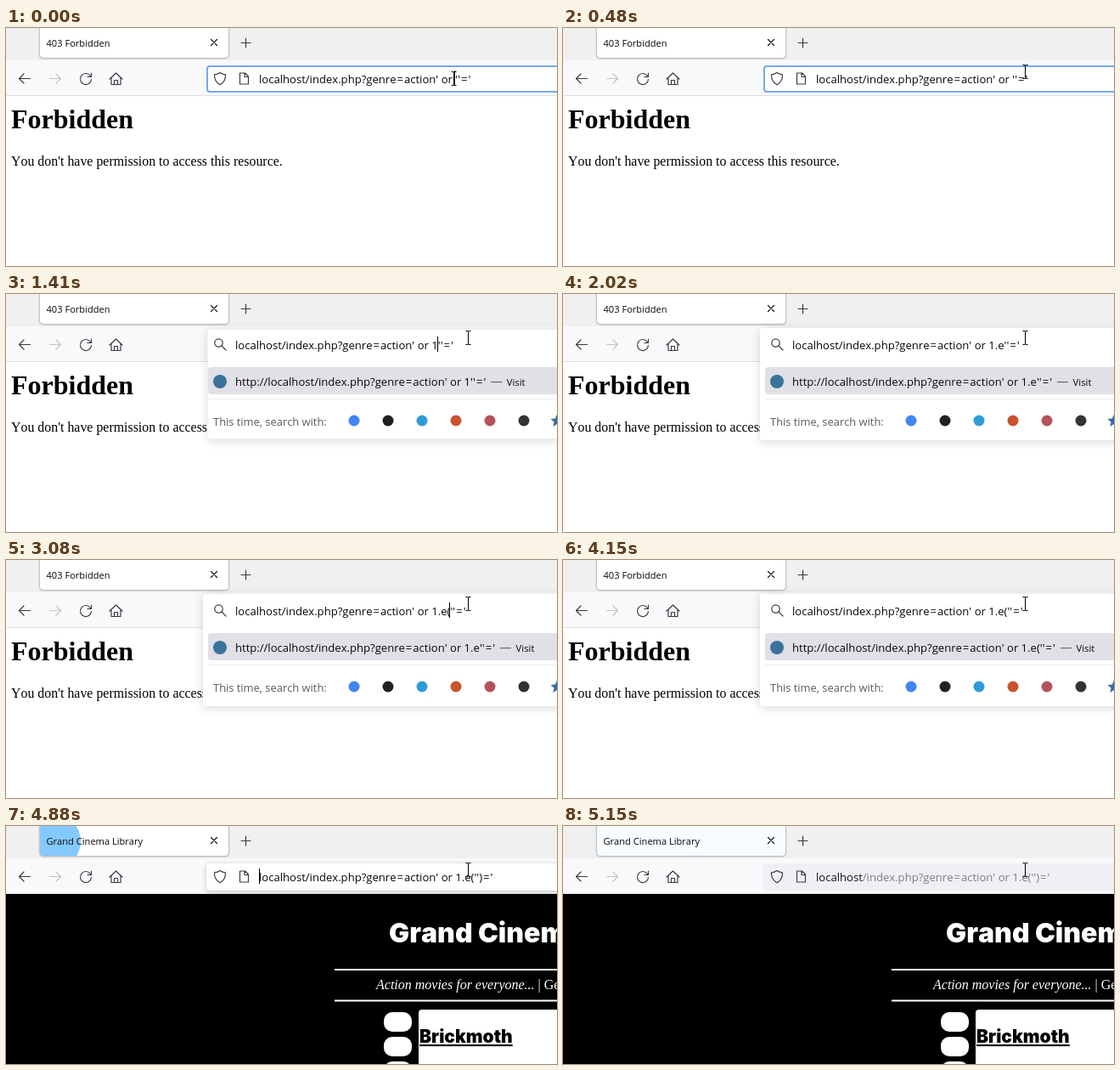
An HTML page for the animation above (5420 ms loop, 649 px wide and 280 px high).

```html
<!DOCTYPE html>
<html lang="en">
<head>
<meta charset="utf-8">
<title>Browser session</title>
<style>
  html, body { margin: 0; width: 100%; height: 100%; overflow: hidden; background: #fff; }
  #stage { position: relative; width: 649px; height: 280px; overflow: hidden; background: #fff;
    font: 13.08px/20px "Open Sans", "Noto Sans", sans-serif; font-kerning: none; color: #08080c; }
  #stage > *, #popup > * { position: absolute; }
  svg { left: 0; top: 0; overflow: visible; }
  .line { white-space: pre; }
  .line i { font-style: normal; padding: 0 1px; }
  .line i.pct { padding: 0 .5px; }
  #strip { left: 0; top: 0; width: 649px; height: 39px; background: #f0f0f0; }
  #tools { left: 0; top: 38px; width: 649px; height: 41px; background: #f9f9fb; border-bottom: 1px solid #dfdfe1; }
  #tab { left: 40px; top: -6px; width: 222px; height: 41px; border-radius: 4px; background: #fff;
    box-shadow: 0 0 2px rgba(0, 0, 0, .5), 0 1px 3px rgba(0, 0, 0, .15); overflow: hidden; }
  #burst { position: absolute; left: 16px; top: 24px; border-radius: 50%; background: #84c9ff;
    transform: translate(-50%, -50%); }
  #bar { left: 236px; top: 44px; width: 440px; height: 32px; box-sizing: border-box; border-radius: 4px; background: #fff; }
  #bar.focus { border: 2px solid #74a9ea; }
  #bar.plain { box-shadow: 0 1px 5px rgba(0, 0, 0, .24); }
  #bar.idle { background: #f0f0f4; }
  #popup { left: 232px; top: 40px; width: 440px; height: 132px; }
  #sheet { inset: 0; background: #fff; border-radius: 4px; box-shadow: 0 2px 12px rgba(0, 0, 0, .16); }
  #row { left: 6px; top: 46px; width: 440px; height: 32px; border-radius: 4px; background: #e0e0e6; }
  #rule { left: 6px; top: 83px; width: 440px; height: 1px; background: #ececef; }
  #hint { left: 38px; top: 53px; }
  #hint b { font-weight: 400; font-size: 14px; margin-left: 5.5px; color: #5b5b66; }
  #hint em { font-style: normal; font-size: 11.3px; margin-left: 5px; }
  #with { left: 12px; top: 100px; font-size: 12.9px; color: #5b5b66; }
  #url { top: 50px; }
  #url.idle { color: #7d7c84; }
  #url.idle span { color: #15141a; }
  #caret { top: 50px; width: 1px; height: 18px; background: #000; }
</style>
</head>
<body>
<div id="stage">
  <svg id="denied" width="649" height="280" font-family="Liberation Serif, Times New Roman, serif" fill="#000">
    <text x="6" y="118" font-size="32" font-weight="700">Forbidden</text>
    <text x="6" y="162" font-size="15.900">You don't have permission to access this resource.</text>
  </svg>
  <svg id="site" width="649" height="280">
    <rect y="79" width="649" height="201"/>
    <g fill="#fff">
      <text x="451" y="137" font-family="Inter, sans-serif" font-size="32" font-weight="900">Grand Cinema Library</text>
      <rect x="387" y="168" width="262" height="2"/>
      <rect x="387" y="204.500" width="262" height="2"/>
      <text x="436" y="192" font-family="Liberation Serif, serif" font-size="16"><tspan font-style="italic">Action movies for everyone...</tspan> | Genre</text>
      <rect x="445" y="219" width="33" height="23" rx="10"/>
      <rect x="445" y="248" width="33" height="23" rx="10"/>
      <rect x="445" y="277" width="33" height="23" rx="10"/>
      <rect x="486" y="216" width="180" height="80" rx="4"/>
    </g>
    <text x="487" y="255" font-family="Inter, sans-serif" font-size="21" font-weight="900" text-decoration="underline">Brickmoth</text>
  </svg>

  <div id="strip"></div>
  <div id="tools"></div>
  <div id="tab"><div id="burst"></div></div>
  <svg width="649" height="80" fill="none" stroke="#3a3a42" stroke-width="1.2" stroke-linecap="round" stroke-linejoin="round">
    <text id="title" y="22" font-size="11.100" fill="#08080c" stroke="none"></text>
    <circle id="dot" cy="17" r="2.200" fill="#5c1a66" stroke="none"/>
    <path d="M241.500 13.500l7 7m0-7l-7 7" stroke="#15141a"/>
    <path d="M277 17.500h11m-5.500-5.500v11"/>
    <path d="M28.500 59.500h-13m5.500-5.500L15.500 59.500l5.500 5.500"/>
    <path d="M51.500 59.500h13m-5.500-5.500l5.500 5.500l-5.500 5.500" stroke="#c3c3c8"/>
    <path d="M99.500 56.500a6.500 6.500 0 1 0 1 4M100.500 53v4.500h-4.500"/>
    <path d="M122 60l7.500-7l7.500 7M124 58.500v8h11v-8M127.500 66.500v-5h4v5"/>
  </svg>

  <div id="bar"></div>
  <div id="popup">
    <div id="sheet"></div>
    <div id="row"></div>
    <div id="rule"></div>
    <div id="hint" class="line"></div>
    <div id="with" class="line">This time, search with:</div>
    <svg id="engines" width="417" height="132"></svg>
  </div>
  <svg width="649" height="80" fill="none" stroke="#3a3a42" stroke-width="1.2" stroke-linejoin="round">
    <g id="info">
      <path d="M252 52.500q3 2 6.500 2.300q.5 8-6.500 12q-7-4-6.500-12q3.500-.3 6.500-2.300z"/>
      <path d="M275.500 53h6l4 4v9h-10zM281 53v4.500h4.500"/>
    </g>
    <g id="lens"><circle cx="250.500" cy="57.500" r="4.700"/><path d="M254 61l5 5" stroke-linecap="round"/></g>
  </svg>
  <div id="url" class="line"></div>
  <div id="caret"></div>
  <svg id="mouse" width="8" height="18" fill="none" stroke="#000" stroke-width="1">
    <path d="M-3-8h2.500l.5.5l.5-.5H3M0-7.500v15M-3 8h2.500l.5-.5l.5.5H3"/>
  </svg>
</div>
<script>
const LOOP = 5420;
const $ = id => document.getElementById(id);
const head = "localhost/index.php?genre=action' or ";

// Each table holds [start ms, value]; a value stays until the next row.
const typed = [[0, "''='"], [1340, "1''='"], [1750, "1.''='"], [1950, "1.e''='"], [3080, "1.e(''='"], [4350, "1.e('')='"]];
const hinted = [[0, "1''='"], [1750, "1.''='"], [2020, "1.e''='"], [3150, "1.e(''='"], [4350, "1.e('')='"]];
const carets = [[0, 528], [410, 0], [940, 528], [1340, 508], [1750, 511], [1950, 518], [2020, 0], [2550, 518],
  [3080, 522], [3550, 525], [3620, 528], [4150, 0], [4350, 532], [4680, 0], [4880, 298], [5020, 0]];
const dots = [[0, 0], [4680, 56], [4750, 53], [4810, 50], [4880, 0]];
const bursts = [[0, [0, 0]], [4880, [32, 1]], [4950, [90, .5]], [5020, [180, .2]], [5150, [240, .06]]];
const grow = [[0, .975], [1480, .99], [1550, 1]];
const moves = [130, 200, 270, 340, 410, 480];

const at = (table, t) => table.reduce((v, row) => t >= row[0] ? row[1] : v, table[0][1]);
const show = (id, on) => { $(id).style.visibility = on ? "visible" : "hidden"; };
const pad = s => s.replace(/[=%]/g, c => c === "%" ? '<i class="pct">%</i>' : "<i>=</i>");

const cache = {};
function fill(id, html) {
  if (cache[id] !== html) $(id).innerHTML = cache[id] = html;
}

function drawEngines() {
  const colors = ["#4285f4", "#222", "#2f9bd6", "#c8542e", "#b5525a", "#333"];
  const disc = (x, y, r, c) => `<circle cx="${x}" cy="${y}" r="${r}" fill="${c}"/>`;
  const star = Array.from({ length: 10 }, (_, i) => {
    const a = i * Math.PI / 5, r = i % 2 ? 3.6 : 8;
    return [417 + r * Math.sin(a), 109.5 - r * Math.cos(a)];
  });
  $("engines").innerHTML = disc(20, 63, 8, "#3b7299") +
    colors.map((c, i) => disc(178 + 40 * i, 109, 6.5, c)).join("") +
    `<polygon points="${star.join(" ")}" fill="#356aa8"/>`;
}

function draw(t) {
  const loaded = t >= 4880, sent = t >= 4680, idle = t >= 5020;
  const open = t >= 1410 && !sent;
  const searching = t >= 1340 && !loaded;

  show("denied", !loaded);
  show("site", loaded);
  show("popup", open);
  show("bar", !open);
  show("lens", searching);
  show("info", !searching);
  $("bar").className = idle ? "idle" : sent ? "plain" : "focus";
  $("sheet").style.transform = `scale(${at(grow, t)})`;

  const full = head + at(typed, t);
  const sentText = "localhost/index.php?genre=action%27%20or%201.e(%27%27)=%27";
  fill("url", pad(sent && !loaded ? sentText : full).replace("localhost", "<span>localhost</span>"));
  $("url").className = idle ? "line idle" : "line";
  $("url").style.left = (searching ? 270 : 298) + "px";
  fill("hint", pad("http://" + head + at(hinted, t)) + "<b>—</b><em>Visit</em>");

  const caret = at(carets, t);
  show("caret", caret);
  $("caret").style.left = caret + "px";

  const dot = at(dots, t);
  show("dot", dot);
  $("dot").setAttribute("cx", dot);
  fill("title", loaded ? "Grand Cinema Library" : "403 Forbidden");
  $("title").setAttribute("x", dot ? 69.5 : 47.5);

  const [r, alpha] = at(bursts, t), burst = $("burst").style;
  burst.width = burst.height = 2 * r + "px";
  burst.opacity = alpha;

  const p = moves.filter(m => t >= m).length / moves.length;
  const ease = p * p * (3 - 2 * p);
  $("mouse").style.transform = `translate(${527.5 + 17 * ease}px, ${59.5 - 8 * ease}px)`;
}

drawEngines();
const start = performance.now();
function tick() {
  draw((performance.now() - start) % LOOP);
  requestAnimationFrame(tick);
}
tick();
</script>
</body>
</html>
```
